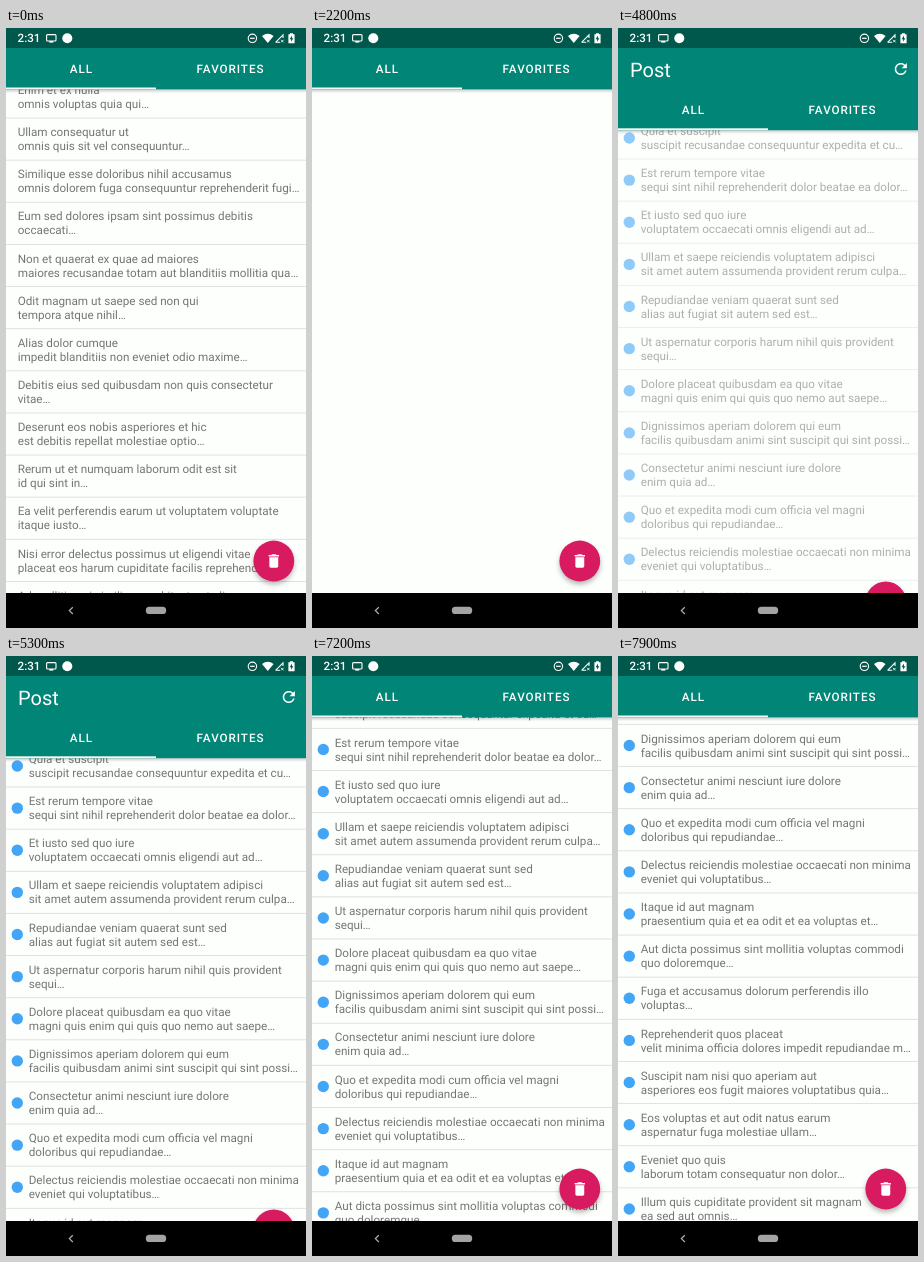
Animation of 300 by 600 pixels, one loop 8000 ms. Source, as an HTML page:

```html
<!DOCTYPE html>
<html lang="en">
<head>
<meta charset="utf-8">
<title>Post list</title>
<style>
  html, body { margin: 0; width: 100%; height: 100%; overflow: hidden; background: #fdfffd; }
  svg { display: block; width: 100%; height: 100%; font-family: Roboto, "Noto Sans", sans-serif; }
  .row text { font-size: 11.7px; fill: #757575; }
  .row line { stroke: #dfe1e0; }
  .row circle { fill: #42a5f5; }
  .tab { font-size: 11.7px; font-weight: 500; letter-spacing: .08em; fill: #fff; }
  #fab > circle { fill: #d81b60; filter: drop-shadow(0 3px 2.5px rgba(0, 0, 0, .28)); }
</style>
</head>
<body>
<svg viewBox="0 0 300 600" text-rendering="geometricPrecision">
  <defs>
    <linearGradient id="shade" x2="0" y2="1">
      <stop offset="0" stop-color="#000" stop-opacity=".2"/>
      <stop offset="1" stop-color="#000" stop-opacity="0"/>
    </linearGradient>
  </defs>
  <rect width="300" height="600" fill="#fdfffd"/>
  <g id="oldList"></g>
  <g id="newList"></g>
  <path id="glow" fill="#008577"/>

  <g id="fab">
    <circle r="20.4"/>
    <path transform="scale(.74) translate(-12 -12)" fill="#fff"
      d="M6 19c0 1.1.9 2 2 2h8c1.1 0 2-.9 2-2V7H6v12zM19 4h-3.5l-1-1h-5l-1 1H5v2h14V4z"/>
  </g>

  <!-- Drawn fully open; slides up beneath the status bar -->
  <g id="header">
    <rect y="102" width="300" height="4" fill="url(#shade)"/>
    <rect y="20" width="300" height="82.2" fill="#008577"/>
    <text x="12" y="48.8" font-size="20" fill="#fff">Post</text>
    <path transform="translate(282.8 41) scale(.76) translate(-12 -12)" fill="#fff"
      d="M17.65 6.35C16.2 4.9 14.21 4 12 4c-4.42 0-7.99 3.58-7.99 8s3.57 8 7.99 8c3.73 0 6.84-2.55 7.73-6h-2.08c-.82 2.33-3.04 4-5.65 4-3.31 0-6-2.69-6-6s2.69-6 6-6c1.66 0 3.14.69 4.22 1.78L13 11h7V4l-2.35 2.35z"/>
    <text class="tab" x="63.8" y="86.1">ALL</text>
    <text class="tab" x="190.6" y="86.1">FAVORITES</text>
    <rect y="100.3" width="150" height="1.8" fill="#f4faf9"/>
  </g>

  <g id="status" fill="#fff">
    <rect width="300" height="20" fill="#00574b"/>
    <text x="11.6" y="14.4" font-size="11.6" font-weight="500">2:31</text>
    <rect x="40.6" y="6.6" width="9.4" height="6.4" rx="1" fill="none" stroke="#fff" stroke-width="1.1"/>
    <rect x="43.3" y="13" width="4" height="1.6"/>
    <circle cx="61.3" cy="10.3" r="5"/>
    <circle cx="246.4" cy="10.3" r="4.2" fill="none" stroke="#fff" stroke-width="1.1"/>
    <rect x="244.1" y="9.7" width="4.6" height="1.2"/>
    <path d="M256 8Q261.8 3.6 267.6 8L261.8 15Z"/>
    <path d="M269.6 14.3L277 6.9V10M269.6 14.3H274" fill="none" stroke="#fff" stroke-width="1.1"/>
    <path d="M275 11.8l2.6 2.6m0-2.6l-2.6 2.6" stroke="#fff" stroke-width=".9"/>
    <path d="M284 5.3h3v1h1.6v8.9h-6.2V6.3H284z"/>
    <path d="M286 7.6l-2.4 3.6h1.5v2.6l2.3-3.6h-1.4z" fill="#00574b"/>
  </g>

  <g id="nav">
    <rect y="565" width="300" height="35"/>
    <path d="M66.8 579.2l-3.4 3.4 3.4 3.4" fill="none" stroke="#adadad" stroke-width="1.3"/>
    <rect x="139.8" y="578.8" width="20.4" height="7.2" rx="3.6" fill="#a3a3a3"/>
  </g>
</svg>

<script>
const LOOP = 8000, STEP = 100, PITCH = 42.13, BAR = 40.8, OPEN = 102;

const oldPosts = `Enim et ex nulla|omnis voluptas quia qui…
Ullam consequatur ut|omnis quis sit vel consequuntur…
Similique esse doloribus nihil accusamus|omnis dolorem fuga consequuntur reprehenderit fugi…
Eum sed dolores ipsam sint possimus debitis|occaecati…
Non et quaerat ex quae ad maiores|maiores recusandae totam aut blanditiis mollitia qua…
Odit magnam ut saepe sed non qui|tempora atque nihil…
Alias dolor cumque|impedit blanditiis non eveniet odio maxime…
Debitis eius sed quibusdam non quis consectetur|vitae…
Deserunt eos nobis asperiores et hic|est debitis repellat molestiae optio…
Rerum ut et numquam laborum odit est sit|id qui sint in…
Ea velit perferendis earum ut voluptatem voluptate|itaque iusto…
Nisi error delectus possimus ut eligendi vitae|placeat eos harum cupiditate facilis reprehenderit d…
Ad mollitia qui similique architecto ut alias|quis…`;

const newPosts = `Quia et suscipit|suscipit recusandae consequuntur expedita et cu…
Est rerum tempore vitae|sequi sint nihil reprehenderit dolor beatae ea dolor…
Et iusto sed quo iure|voluptatem occaecati omnis eligendi aut ad…
Ullam et saepe reiciendis voluptatem adipisci|sit amet autem assumenda provident rerum culpa…
Repudiandae veniam quaerat sunt sed|alias aut fugiat sit autem sed est…
Ut aspernatur corporis harum nihil quis provident|sequi…
Dolore placeat quibusdam ea quo vitae|magni quis enim qui quis quo nemo aut saepe…
Dignissimos aperiam dolorem qui eum|facilis quibusdam animi sint suscipit qui sint possi…
Consectetur animi nesciunt iure dolore|enim quia ad…
Quo et expedita modi cum officia vel magni|doloribus qui repudiandae…
Delectus reiciendis molestiae occaecati non minima|eveniet qui voluptatibus…
Itaque id aut magnam|praesentium quia et ea odit et ea voluptas et…
Aut dicta possimus sint mollitia voluptas commodi|quo doloremque…
Fuga et accusamus dolorum perferendis illo|voluptas…
Reprehenderit quos placeat|velit minima officia dolores impedit repudiandae m…
Suscipit nam nisi quo aperiam aut|asperiores eos fugit maiores voluptatibus quia…
Eos voluptas et aut odit natus earum|aspernatur fuga molestiae ullam…
Eveniet quo quis|laborum totam consequatur non dolor…
Illum quis cupiditate provident sit magnam|ea sed aut omnis…`;

const $ = id => document.getElementById(id);
const ramp = (t, a, b) => Math.min(1, Math.max(0, (t - a) / (b - a)));
const smooth = p => p * p * (3 - 2 * p);
const moveY = (id, y, x = 0) => $(id).setAttribute('transform', `translate(${x} ${y.toFixed(2)})`);
const fade = (id, a) => $(id).setAttribute('opacity', a);

function fillList(id, posts, x, dot) {
  $(id).innerHTML = posts.split('\n').map((post, i) => {
    const [title, body] = post.split('|');
    return `<g class="row" transform="translate(0 ${(i * PITCH).toFixed(2)})">
      <text x="${x}" y="18.2">${title}</text><text x="${x}" y="32.2">${body}</text>
      ${dot ? '<circle cx="11.3" cy="21.1" r="5.7"/>' : ''}
      <line x2="300" y1="${PITCH}" y2="${PITCH}"/></g>`;
  }).join('');
}

// Overscroll arc: a wide circle cut off by the header edge
function drawGlow(depth) {
  const r = 450, cx = 208, half = Math.sqrt(r * r - (r - depth) ** 2);
  $('glow').setAttribute('d', depth > 0
    ? `M${cx - half} ${OPEN}A${r} ${r} 0 0 0 ${cx + half} ${OPEN}Z` : '');
}

// Distance the finger has pushed the new list up
function dragged(t) {
  return 179.5 * ramp(t, 7000, 7500) + 149 * ramp(t, 7500, 7900);
}

function draw(time) {
  const t = Math.floor(time / STEP) * STEP;
  const drag = dragged(t);
  const closed = BAR * (1 - smooth(ramp(t, 2900, 3700))) + Math.min(BAR, drag);
  const rest = t < 6700 ? 13.1 : 0;
  const glow = t < 6700 ? 0 : 1 - ramp(t, 6700, 7100);

  moveY('header', -closed);
  moveY('fab', 573.8 - closed, 267.8);
  moveY('oldList', 47.9);
  moveY('newList', OPEN - rest - drag);
  fade('oldList', 1 - ramp(t, 1600, 2200));
  fade('newList', ramp(t, 4100, 5300));
  drawGlow(39.5 * glow);
  fade('glow', .16 * glow);
}

fillList('oldList', oldPosts, 11.7, false);
fillList('newList', newPosts, 22.7, true);

const start = performance.now();
function tick() {
  draw((performance.now() - start) % LOOP);
  requestAnimationFrame(tick);
}
tick();
</script>
</body>
</html>
```
